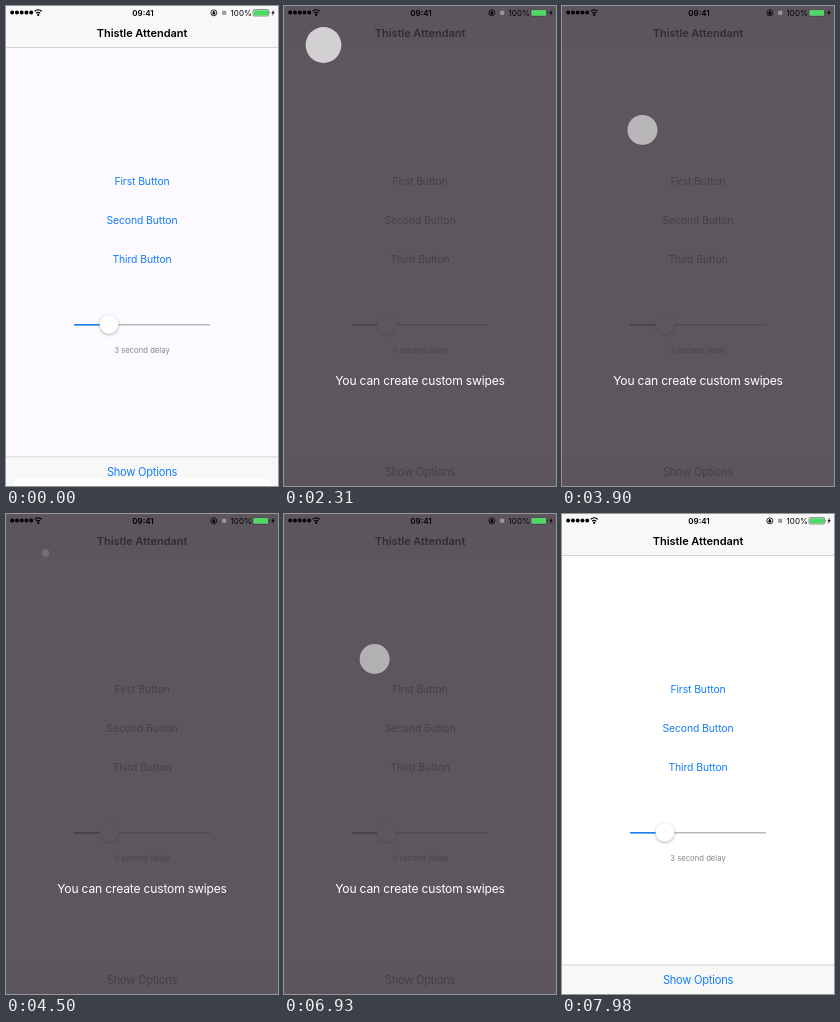
Recreate the animation shown at these times as an HTML page. Size 272 by 480 pixels, loop 8 s.

```html
<!DOCTYPE html>
<html lang="en">
<head>
<meta charset="utf-8">
<title>Swipe hint</title>
<style>
  html, body { margin: 0; width: 100%; height: 100%; overflow: hidden; background: #fff; }
  svg { display: block; width: 100%; height: 100%; --tint: rgb(20, 126, 251); --dim: 0; }
  text { font-family: Inter, Roboto, sans-serif; text-anchor: middle; }
  .title { font-size: 11px; font-weight: 600; letter-spacing: -.05px; }
  .button { font-size: 10.4px; letter-spacing: -.1px; fill: var(--tint); }
  .option { font-size: 11.1px; letter-spacing: -.23px; fill: var(--tint); }
  .delay { font-size: 7.7px; fill: #86868b; }
  .message { font-size: 12.1px; letter-spacing: -.18px; fill: #fff; opacity: var(--dim); }
  .status { font-size: 8px; font-weight: 600; }
  .percent { font-size: 8px; font-weight: 400; }
  .bar { fill: #f8f8f9; }
  .hairline { fill: #b9b9bc; opacity: calc(1 - var(--dim)); }
  .thumb { filter: drop-shadow(0 1.6px 1.6px rgba(0, 0, 0, .3)); }
  .veil { opacity: var(--dim); }
</style>
</head>
<body>
<svg viewBox="0 0 272 480">
  <rect id="page" width="272" height="480" fill="#fff"/>

  <rect class="bar" width="272" height="42"/>
  <rect class="hairline" y="41.4" width="272" height=".6"/>
  <text class="title" x="136" y="31.3">Thistle Attendant</text>

  <text class="button" x="136" y="178.7">First Button</text>
  <text class="button" x="136" y="217.8">Second Button</text>
  <text class="button" x="136" y="257">Third Button</text>

  <rect x="68" y="318.1" width="136" height="1.5" rx=".7" fill="#b7b7b9"/>
  <rect x="68" y="318.1" width="35" height="1.5" rx=".7" fill="var(--tint)"/>
  <circle class="thumb" cx="103" cy="318.3" r="9.4" fill="#fff"/>
  <text class="delay" x="136" y="346.6">3 second delay</text>

  <rect class="bar" y="451" width="272" height="29"/>
  <rect class="hairline" y="450.6" width="272" height=".6"/>
  <text class="option" x="136" y="469.7">Show Options</text>
  <rect id="sheet" x="7" width="258" height="30" rx="8" fill="#fff"/>

  <g class="veil">
    <rect width="272" height="480" fill="rgb(61, 53, 61)" fill-opacity=".83"/>
    <text class="message" x="136" y="378.6">You can create custom swipes</text>
    <circle id="touch" fill="#fff"/>
  </g>

  <g id="statusbar">
    <path d="M6.2 6.6h19.4" stroke="#000" stroke-width="4" stroke-linecap="round" stroke-dasharray="0 4.75"/>
    <g fill="none" stroke="#000" stroke-width="1.2">
      <path d="M28.6 5.4a5.2 5.2 0 0 1 7.2 0M30.2 7.2a3 3 0 0 1 4 0"/>
      <circle cx="32.2" cy="8.9" r=".5"/>
      <circle cx="207.8" cy="6.8" r="3" stroke-width=".8"/>
    </g>
    <path d="M206.4 6.4h2.8v2.1h-2.8zM206.9 6.4v-.6a.9.9 0 0 1 1.8 0v.6"/>
    <rect x="216.2" y="4.8" width="4" height="4" fill="#98989b"/>
    <text class="status" x="137" y="9.8">09:41</text>
    <text class="percent" x="235.2" y="9.8">100%</text>
    <rect x="247" y="3.6" width="15.6" height="6.4" rx="1.2" fill="#fff" fill-opacity=".4" stroke="#222" stroke-width=".5"/>
    <rect x="247.6" y="4.2" width="14.4" height="5.2" rx=".7" fill="#4cd964"/>
    <path d="M263.2 5.8q1 1 0 2zM267.8 3.6l-2.4 3.6h1.5l-.7 2.8 2.5-3.7h-1.5z"/>
  </g>
</svg>
<script>
  const LOOP = 8000, CYCLE = 3000, FIRST_TOUCH = 1475;
  const BLUE = [20, 126, 251], GRAY = [118, 116, 118];
  const svg = document.querySelector('svg');
  const [page, sheet, touch] =
    ['page', 'sheet', 'touch'].map(id => document.getElementById(id));

  const ramp = (t, from, to) => Math.min(1, Math.max(0, (t - from) / (to - from)));
  const smooth = (t, from, to) => {
    const u = ramp(t, from, to);
    return u * u * (3 - 2 * u);
  };
  const blend = (a, b, u) => `rgb(${a.map((v, i) => Math.round(v + (b[i] - v) * u))})`;
  const set = (el, attrs) => {
    for (const key in attrs) el.setAttribute(key, attrs[key]);
  };

  // Appear, press slowly, swipe, then release while fading.
  function drawTouch(t) {
    const grow = 1 - (1 - ramp(t, 0, 240)) ** 2;
    const press = ramp(t, 620, 2220) ** 1.6;
    const swipe = smooth(t, 2235, 2660);
    const release = smooth(t, 2620, 2870);
    const fade = ramp(t, 2220, 2800) ** 1.5;
    set(touch, {
      cx: 39.5 + 96.5 * swipe,
      cy: 39 + 200 * swipe,
      r: grow * (18 - 3 * press + 3 * release),
      'fill-opacity': .72 * grow * (1 - fade)
    });
  }

  function draw(now) {
    const t = now % LOOP;
    set(page, { fill: blend([253, 250, 255], [255, 255, 255], ramp(t, 0, 800)) });
    set(sheet, { y: 472 + 9 * ramp(t, 0, 100) });
    svg.style.setProperty('--dim', smooth(t, 1570, 1970) - smooth(t, 7020, 7320));
    svg.style.setProperty('--tint',
      blend(BLUE, GRAY, smooth(t, 1680, 2000) - smooth(t, 7330, 7630)));
    drawTouch(Math.max(0, t - FIRST_TOUCH) % CYCLE);
  }

  const start = performance.now();
  function tick() {
    draw(performance.now() - start);
    requestAnimationFrame(tick);
  }
  tick();
</script>
</body>
</html>
```
